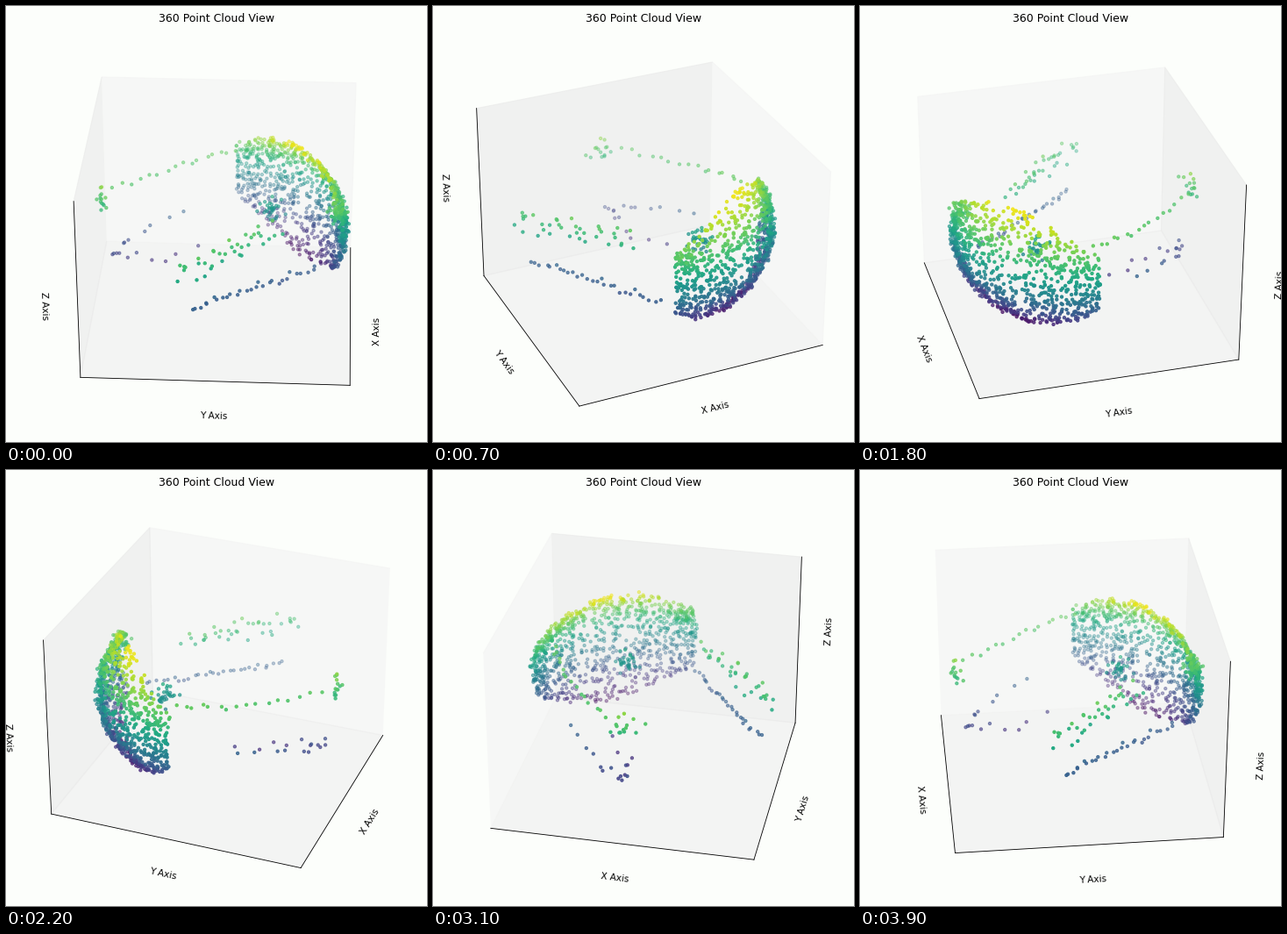
Recreate the animation shown at these times as a matplotlib script. Size 480 by 497 pixels, loop 4000 ms.

```python
import numpy as np
import matplotlib.pyplot as plt
from matplotlib.animation import FuncAnimation

W, H, DPI = 480, 497, 75
FRAMES, INTERVAL = 40, 100
BACK = "#fcfefb"
HALF = 0.5952          # half side of the box floor
SQUASH = 0.75          # the box is lower than it is wide
RADIUS = 0.56          # radius of the scanned shell

rng = np.random.default_rng(12)


def shell(n, azim=127, spread=49, lift=42):
    """Patch of a sphere that gets lower towards its left and right ends."""
    turn = np.radians(rng.uniform(-spread, spread, n))
    top = np.radians(lift) * np.cos(turn) ** 1.7
    up = np.sin(top) * rng.uniform(-1, 1, n)
    flat = np.sqrt(1 - up**2)
    a = turn + np.radians(azim)
    r = RADIUS + rng.normal(0, 0.008, n)
    return np.column_stack([r * flat * np.cos(a), r * flat * np.sin(a),
                            r * up * SQUASH])


def blob(center, spread, n):
    return rng.normal(center, spread, (n, 3))


def trail(start, bend, end, n, jitter):
    """Jittered points along a quadratic curve."""
    start, bend, end = map(np.array, (start, bend, end))
    t = np.linspace(0, 1, n)[:, None]
    curve = (1 - t) ** 2 * start + 2 * t * (1 - t) * bend + t**2 * end
    return curve + rng.normal(0, jitter, (n, 3))


points = np.vstack([
    shell(930),
    blob((.065, .52, .128), .022, 34),
    blob((-.15, .224, .01), .03, 30),
    # far side: upper line with a clump at its tip, lower hook
    trail((-.45, .03, .15), (-.375, -.2, .14), (-.07, -.5, .13), 16, .008),
    blob((-.01, -.54, .14), (.03, .015, .03), 14),
    trail((-.33, -.18, -.125), (.16, -.86, -.175), (-.12, -.1, -.21), 17, .013),
    # near side: loose upper line, tight lower line
    trail((.2, .25, .09), (.41, .06, .11), (.59, -.16, .1), 36,
          (.02, .02, .033)),
    trail((.14, .44, -.125), (.33, .13, -.12), (.53, -.1, -.115), 28, .008),
])

fig = plt.figure(figsize=(W / DPI, H / DPI), dpi=DPI, facecolor=BACK)
side = 464.4
ax = fig.add_axes([7.7 / W, 7.5 / H, side / W, side / H],
                  projection="3d", facecolor=BACK)
x, y, z = points.T
ax.scatter(x, y, z, c=z, s=10, cmap="viridis", vmin=-.29, vmax=.29)
ax.set(xlim=(-HALF, HALF), ylim=(-HALF, HALF),
       zlim=(-SQUASH * HALF, SQUASH * HALF),
       xticks=[], yticks=[], zticks=[],
       xlabel="X Axis", ylabel="Y Axis", zlabel="Z Axis")
fig.text(.5, 1 - 18 / H, "360 Point Cloud View", size=12,
         ha="center", va="baseline")


def update(i):
    ax.view_init(elev=30, azim=3 + 360 * i / FRAMES)
    return []


anim = FuncAnimation(fig, update, frames=FRAMES, interval=INTERVAL)
plt.show()
```
